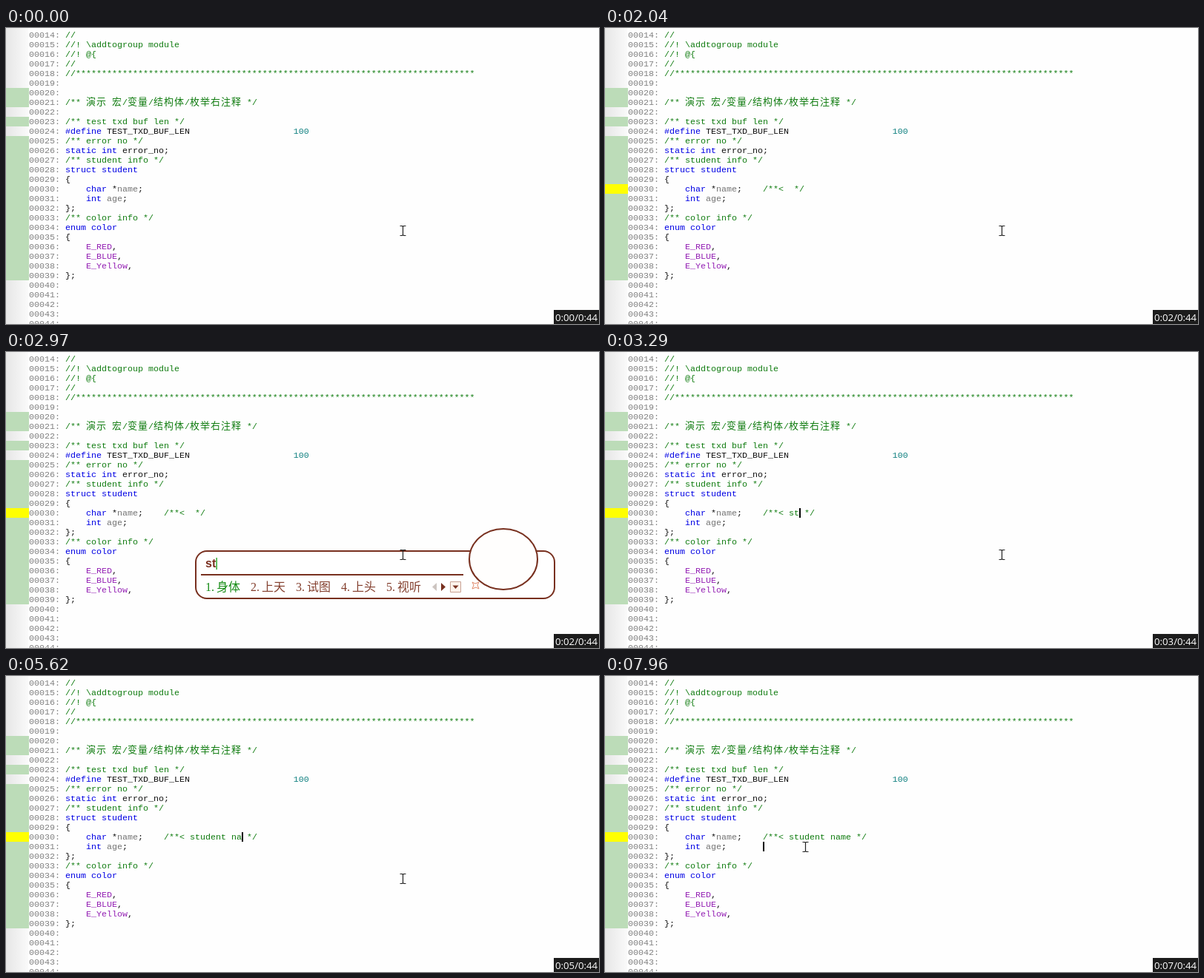
Recreate the animation shown at these times as an HTML page. Size 800 by 400 pixels, loop 8000 ms.

```html
<!DOCTYPE html>
<html lang="en">
<head>
<meta charset="utf-8">
<title>Code comment demo</title>
<style>
  html, body { margin: 0; width: 100%; height: 100%; overflow: hidden; background: #fefefe; }
  svg { display: block; width: 800px; height: 400px; }
  text { white-space: pre; }
  .code { font: 11.667px "Liberation Mono", "Courier New", monospace; fill: #111; }
  .num { fill: #808080; }
  .com { fill: #107c10; }
  .key { fill: #0000e4; }
  .mem { fill: #747474; }
  .val { fill: #108080; }
  .enm { fill: #9420b4; }
  .cjk { font: 300 13px "Noto Sans CJK SC", "Noto Sans CJK", sans-serif; letter-spacing: 1px; }
  .clock { font: 13.2px "Open Sans", "Noto Sans", sans-serif; fill: #fff; }
  .spell { font: bold 16px "Liberation Sans", Arial, sans-serif; fill: #7a3020; }
  .cand { font: 16px "Liberation Serif", serif; fill: #84402f; }
  .word { font: 300 16px "Noto Sans CJK SC", "Noto Sans CJK", sans-serif; }
  .first { fill: #128a12; }
</style>
</head>
<body>
<svg viewBox="0 0 800 400">
  <defs>
    <linearGradient id="edge">
      <stop offset="0" stop-color="#e6e6e6"/>
      <stop offset="1" stop-color="#fafafa"/>
    </linearGradient>
  </defs>
  <rect width="800" height="400" fill="#fefefe"/>
  <rect width="30" height="400" fill="url(#edge)"/>
  <path d="M0 81h31v26h-31zM0 120h31v13h-31zM0 146h31v195h-31z" fill="#bcdcb8"/>
  <rect id="mark" y="211" width="31" height="13" fill="#ff0"/>
  <g id="page" class="code"></g>
  <text id="note" class="code com" x="213" y="221"></text>
  <rect id="caret" width="2" height="13"/>

  <g id="ime" stroke-linejoin="round">
    <rect id="frame" x="256" y="269" height="64" rx="15" fill="#fff" stroke="#78301f" stroke-width="2"/>
    <path id="rule" stroke="#78301f" stroke-width="2"/>
    <text id="spell" class="spell" x="269" y="291"></text>
    <rect id="bar" y="278" width="1.3" height="16" fill="#12a012"/>
    <g id="cands"></g>
    <g id="tail">
      <path d="M500 312v11l-6-5.5z" fill="#ccc4c0"/>
      <path d="M506 312v11l6-5.5z" fill="#78301f"/>
      <rect x="518.5" y="310.5" width="14" height="14" fill="#fdf3ec" stroke="#c8a294"/>
      <path d="M521.5 315.500h8l-4 4.500z" fill="#78301f"/>
      <ellipse cx="590" cy="280" rx="46" ry="41" fill="#fffefd" stroke="#78301f" stroke-width="2"/>
      <path d="M548 311l4 2 5-2-2 4 2 5-4-2-5 2 2-5z" fill="#fff" stroke="#e08868"/>
    </g>
  </g>

  <path id="mouse" d="M-4 -6.500h3l1 1 1 -1h3M-4 6.500h3l1 -1 1 1h3M0 -6v12" fill="none" stroke="#222" stroke-width="1.2"/>
  <rect x="739" y="381" width="61" height="19" fill="#1c1c1c"/>
  <text id="clock" class="clock" x="741" y="396"></text>
</svg>
<script>
const LOOP = 8000;
const INSERT = 390, RECOLOR = 660;            // comment appears, member name is parsed again
const OPEN = 2440, SECOND = 2660, SHUT = 3210; // input popup
const COMMIT = 3290, TYPE = 4450, KEY = 165;   // "st" lands, then one letter per KEY
const MOVE = 7010, CLICK = 7490, PLACE = 7640, DRIFT = 7720;
const BLINK = 510;
const NAME = 'student name';

const $ = id => document.getElementById(id);
const set = (node, attrs) => {
  for (const k in attrs) node.setAttribute(k, attrs[k]);
};
const show = (node, on) => node.setAttribute('visibility', on ? 'visible' : 'hidden');
const clamp = v => Math.max(0, Math.min(1, v));
const mix = (a, b, u) => a + (b - a) * u;

// Each part is "class|text"; an empty class is plain code.
const c = s => 'com|' + s, k = s => 'key|' + s, m = s => 'mem|' + s, e = s => 'enm|' + s, p = s => '|' + s;
const FIRST = 13;
const lines = [
  [c('//')],
  [c('//')],
  [c('//! \\addtogroup module')],
  [c('//! @{')],
  [c('//')],
  [c('//' + '*'.repeat(77))],
  [],
  [],
  [c('/** 演示 宏/变量/结构体/枚举右注释 */')],
  [],
  [c('/** test txd buf len */')],
  [k('#define'), p(' TEST_TXD_BUF_LEN' + ' '.repeat(20)), 'val|100'],
  [c('/** error no */')],
  [k('static int'), p(' error_no;')],
  [c('/** student info */')],
  [k('struct student')],
  [p('{')],
  [k('    char'), p(' *'), m('name'), p(';')],
  [k('    int'), p(' '), m('age'), p(';')],
  [p('};')],
  [c('/** color info */')],
  [k('enum color')],
  [p('{')],
  ...['E_RED', 'E_BLUE', 'E_Yellow'].map(s => [e('    ' + s), p(',')]),
  [p('};')],
  [], [], [], [], []
];

function span(part) {
  const [cls, text] = part.split('|');
  const body = text.replace(/[\u4e00-\u9fff]+/g, s => `<tspan class="cjk">${s}</tspan>`);
  return `<tspan class="${cls}">${body}</tspan>`;
}

$('page').innerHTML = lines.map((parts, i) =>
  `<text class="num" x="31" y="${13 * i}">000${FIRST + i}:</text>` +
  `<text x="80" y="${13 * i}">${parts.map(span).join('')}</text>`).join('');
const member = document.querySelector('#page .mem');

function typedCount(t) {
  if (t < COMMIT) return 0;
  return Math.min(NAME.length, 2 + Math.max(0, Math.floor((t - TYPE) / KEY) + 1));
}

// The caret starts a new blink cycle at every edit and click.
function caretOn(t, count) {
  const edit = count > 2 ? TYPE + (count - 3) * KEY : count ? COMMIT : INSERT;
  const reset = t >= PLACE ? PLACE : edit;
  return t >= reset && Math.floor((t - reset) / BLINK) % 2 === 0;
}

function mousePos(t) {
  const u = clamp((t - MOVE) / (CLICK - MOVE)), v = clamp((t - DRIFT) / (LOOP - 40 - DRIFT));
  return [
    mix(535, 222, 1 - (1 - u) ** 2.5) + 48 * v,
    mix(274, 228, u ** 4) + 3 * v
  ];
}

function drawPopup(t) {
  const open = t >= OPEN && t < SHUT;
  show($('ime'), open);
  if (!open) return;
  const size = t < SECOND ? 1 : 2;
  const chars = size === 1 ? '是上谁说↑' : '身体上天试图上头视听';
  const grow = (size - 1) * 81, step = 29 + size * 16;
  set($('ime'), { opacity: clamp((SHUT - t) / 160) });
  set($('frame'), { width: 403 + grow });
  set($('rule'), { d: `M263 301H${536 + grow}` });
  set($('tail'), { transform: `translate(${grow} 0)` });
  set($('bar'), { x: 278 + (size - 1) * 5.5 });
  $('spell').textContent = NAME.slice(0, size);
  let html = '';
  for (let i = 0; i < 5; i++) {
    const x = 269 + i * step;
    html += `<text class="cand ${i ? '' : 'first'}" y="323"><tspan x="${x}">${i + 1}.</tspan>` +
      `<tspan class="word" x="${x + 15}">${chars.substr(i * size, size)}</tspan></text>`;
  }
  $('cands').innerHTML = html;
}

function draw(t) {
  const started = t >= INSERT, count = typedCount(t);
  show($('mark'), started);
  show($('note'), started);
  $('note').textContent = `/**< ${NAME.slice(0, count)} */`;
  member.style.fill = started && t < RECOLOR ? '#111' : '';

  show($('caret'), caretOn(t, count));
  set($('caret'), t >= PLACE ? { x: 213, y: 224 } : { x: 248 + 7 * count, y: 211 });

  drawPopup(t);
  const [x, y] = mousePos(t).map(Math.round);
  set($('mouse'), { transform: `translate(${x + 0.5} ${y})` });
  $('clock').textContent = `0:0${Math.max(0, Math.floor((t - 10) / 1000))}/0:44`;
}

const start = performance.now();
function tick() {
  draw((performance.now() - start) % LOOP);
  requestAnimationFrame(tick);
}
tick();
</script>
</body>
</html>
```
